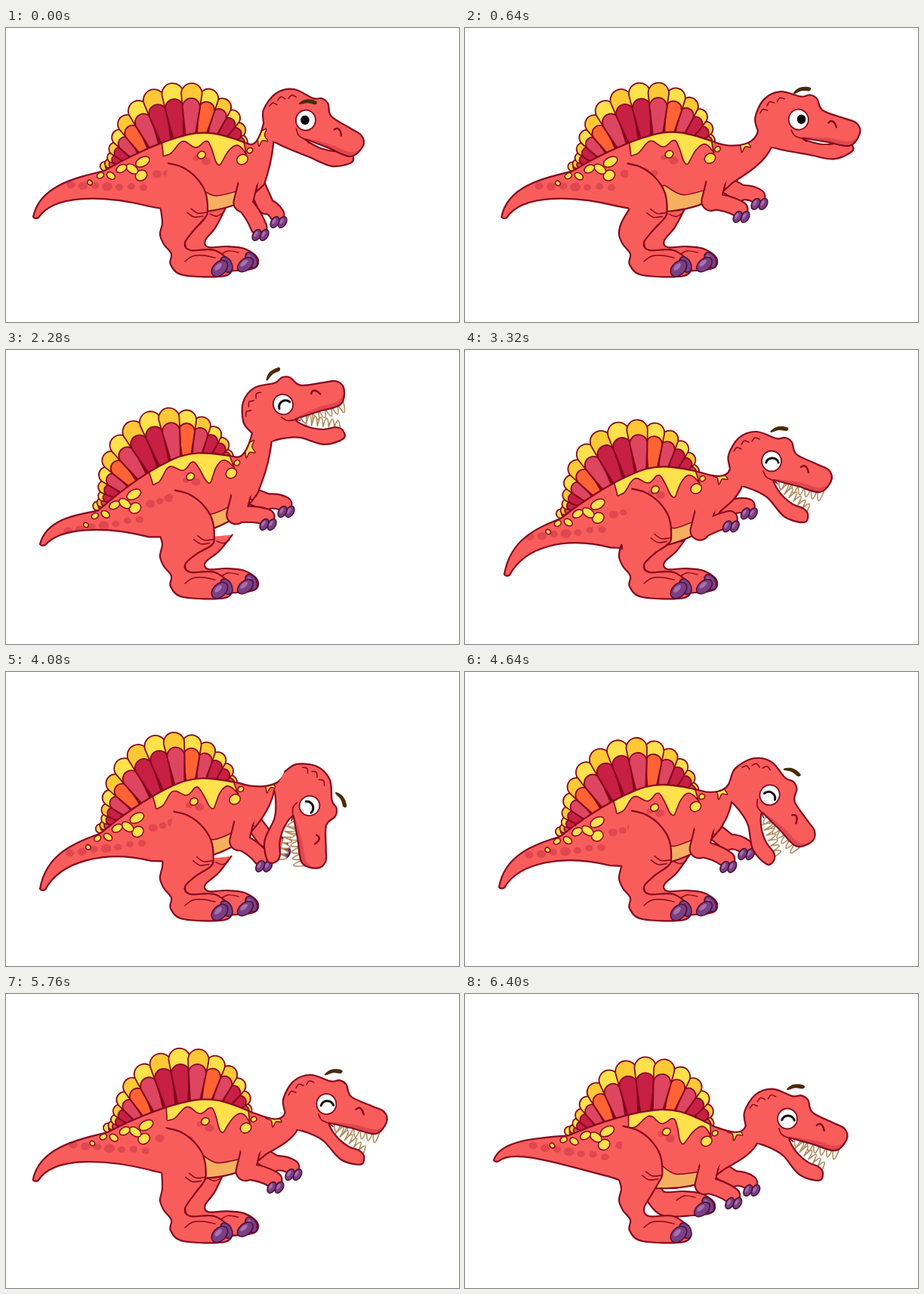
An HTML page with a canvas that plays this animation: 600x389 px, repeating every 6440 ms.

```html
<!DOCTYPE html>
<html lang="en">
<head>
<meta charset="utf-8">
<title>Laughing dinosaur</title>
<style>
html, body { margin: 0; width: 100%; height: 100%; overflow: hidden; background: #fff; }
canvas { display: block; }
</style>
</head>
<body>
<canvas id="stage" width="600" height="389"></canvas>
<script>
const ctx = document.getElementById('stage').getContext('2d');
const LOOP = 6440, STEP = 40, FEATHERS = 15;
const RED = '#f85d5b', DARK = '#e0474f', LINE = '#86091d', GOLD = '#ffe14b', AMBER = '#ffc936';
const PURPLE = '#7a3f86', LILAC = '#a772aa';
const SAIL = ['#ff6233', '#de4560', '#c81f45', '#c81f45', '#de4560'];

// time, torso x y turn, tail tip x y, eye x y, head turn, arm angle
const poses = [
  [0, 219.5, 165.5, 0, 36, 250, 397, 122, 6.5, 77],
  [800, 233, 165, -1, 51, 250, 447, 121, -8, 45],
  [1320, 235, 167.5, -3, 55, 254, 437, 125, -11.5, 34],
  [2280, 205, 172.5, -11, 45, 257, 367, 72, -32.5, 43],
  [2450, 206, 173, -10, 43, 262, 374, 57, -33, 40],
  [3320, 212.5, 187.5, -7.7, 52, 297, 406, 147, 0, 21],
  [4080, 209.5, 175.5, -9.5, 45, 287, 402, 177, 65, 65],
  [5120, 215.5, 187.5, -4.5, 45, 282, 407, 146, 0, 47],
  [5480, 222, 161, 0, 35, 262, 422, 140, -2, 50],
  [6400, 228, 175, 7, 38, 220, 427, 165, 1, 55]];

const rad = d => d * Math.PI / 180;
const mix = (a, b, k) => a + (b - a) * k;
const between = (a, b, k, l = k) => [mix(a[0], b[0], k), mix(a[1], b[1], l)];
const dist = (a, b) => Math.hypot(b[0] - a[0], b[1] - a[1]);
const range = (n, f) => Array.from({ length: n }, (_, i) => f(i));
const noise = i => Math.abs(Math.sin(i * 12.9898 + 4) * 43758.5453) % 1;
const ease = (t, from, to) => {
  const u = Math.min(1, Math.max(0, (t - from) / (to - from)));
  return u * u * (3 - 2 * u);
};

// Smooth motion through the poses, without overshoot
function poseAt(t) {
  const n = poses.length;
  let i = 0;
  while (i < n - 2 && t >= poses[i + 1][0]) i++;
  const a = poses[i], b = poses[i + 1], h = b[0] - a[0], u = Math.min(1, (t - a[0]) / h);
  const secant = (j, c) => (poses[j + 1][c] - poses[j][c]) / (poses[j + 1][0] - poses[j][0]);
  const slope = (j, c) => {
    if (j === 0 || j === n - 1) return 0;
    const p = secant(j - 1, c), q = secant(j, c);
    return p * q <= 0 ? 0 : 2 * p * q / (p + q);
  };
  return a.map((v, c) => mix(v, b[c], u * u * (3 - 2 * u))
    + h * u * (1 - u) * (slope(i, c) * (1 - u) - slope(i + 1, c) * u));
}

function frame(ox, oy, x, y, deg) {
  const c = Math.cos(rad(deg)), s = Math.sin(rad(deg));
  return ([px, py]) => [x + (px - ox) * c - (py - oy) * s, y + (px - ox) * s + (py - oy) * c];
}

// Adds a smooth curve through the points
function through(path, pts, closed, join) {
  const n = pts.length;
  const at = i => closed ? pts[(i + n) % n] : pts[Math.min(n - 1, Math.max(0, i))];
  if (join) path.lineTo(...pts[0]); else path.moveTo(...pts[0]);
  for (let i = 0; i < (closed ? n : n - 1); i++) {
    const p = at(i - 1), a = at(i), b = at(i + 1), q = at(i + 2);
    path.bezierCurveTo(a[0] + (b[0] - p[0]) / 6, a[1] + (b[1] - p[1]) / 6,
      b[0] - (q[0] - a[0]) / 6, b[1] - (q[1] - a[1]) / 6, b[0], b[1]);
  }
  return path;
}

const curve = (pts, closed) => through(new Path2D(), pts, closed);

function paint(path, fill, line, width = 2.2) {
  if (fill) { ctx.fillStyle = fill; ctx.fill(path); }
  if (line) { ctx.strokeStyle = line; ctx.lineWidth = width; ctx.stroke(path); }
}

function oval([x, y], rx, ry, turn, fill, line, width) {
  const p = new Path2D();
  p.ellipse(x, y, rx, ry, turn, 0, 7);
  paint(p, fill, line, width);
}

function claw(x, y, rx, ry, deg) {
  oval([x, y], rx, ry, rad(deg), PURPLE, '#4d1238', 1.6);
  oval([x - rx * .15, y - ry * .25], rx * .5, ry * .35, rad(deg), LILAC);
}

// Height of the back above the torso's own x
const backY = x => 138 + 51 * (Math.abs(x - 262) / 132) ** 1.5;

function feather(root, tip, r, fill) {
  const a = Math.atan2(tip[1] - root[1], tip[0] - root[0]), c = Math.cos(a), s = Math.sin(a), w = r * .5;
  const p = new Path2D();
  p.moveTo(root[0] + s * w, root[1] - c * w);
  p.arc(tip[0] - c * r, tip[1] - s * r, r, a - Math.PI / 2, a + Math.PI / 2);
  p.lineTo(root[0] - s * w, root[1] + c * w);
  paint(p, fill, LINE, 1.8);
}

function drawSail(T) {
  // A fan whose feathers are narrow at both ends and widest near the top
  const spread = range(FEATHERS, i => {
    const u = i / (FEATHERS - 1), w = u ** 1.3 - .05 * Math.sin(2 * Math.PI * u);
    const a = rad(mix(-190, -12, w)), r = 85 + 6 * Math.sin(Math.PI * u) + 27 * (1 - u) ** 5;
    const x = mix(150, 306, w);
    return { tip: T([235 + r * Math.cos(a), 163 + r * Math.sin(a)]), root: T([x, backY(x) + 6]) };
  });
  const order = [...spread.keys()].sort((a, b) => Math.abs(b - 9) - Math.abs(a - 9));
  for (const i of order) {
    const { tip, root } = spread[i];
    const a = Math.max(0, i - 1), b = Math.min(FEATHERS - 1, i + 1);
    const r = Math.max(6, dist(spread[a].tip, spread[b].tip) / (b - a) / 2 + .6);
    feather(root, tip, r, i % 2 ? AMBER : GOLD);
    feather(root, between(root, tip, .73), r * .84, SAIL[i % 5]);
  }
}

function limb(a, elbow, hand, w1, w2) {
  const upper = new Path2D(), fore = new Path2D();
  upper.moveTo(...a); upper.lineTo(...elbow);
  fore.moveTo(...elbow);
  fore.quadraticCurveTo(mix(elbow[0], hand[0], .6), mix(elbow[1], hand[1], .5) - 4, ...hand);
  for (const [color, extra] of [[LINE, 4.2], [RED, 0]]) {
    paint(upper, null, color, w1 + extra);
    paint(fore, null, color, w2 + extra);
  }
  for (const dx of [7, -3]) claw(hand[0] + dx, hand[1] + 10, 8, 5, 120);
}

function drawFarLeg([kx, ky], lift) {
  const foot = (x, y) => [x - lift * 3, y - lift * 28];
  const hip = [kx + 24, ky - 4], heel = foot(264, 281);
  paint(curve([hip, between(hip, heel, .5, .6), heel, foot(268, 290), foot(292, 289), foot(316, 292),
    foot(333, 304), foot(330, 317), foot(305, 321), foot(262, 320), foot(238, 290), [240, 250]]), RED, LINE);
  paint(curve([foot(283, 301), foot(294, 295), foot(308, 297)]), null, LINE, 1.4);
  paint(curve([[kx + 3, ky + 4], [kx + 12, ky + 7], [kx + 20, ky + 3]]), null, LINE, 1.4);
  claw(...foot(325, 307), 11, 7, 62);
  claw(...foot(317, 313), 12, 7.5, -40);
}

function drawLeg(T, knee) {
  const [x, y] = knee;
  paint(curve([[x - 52, y - 63], [x - 34, y - 58], [x - 16, y - 45], [x - 3, y - 25], knee, [x - 4, y + 10],
    between([238, 283], knee, .38), [237, 284], [244, 294], [276, 294], [298, 312], [290, 328],
    [235, 327], [218, 313], [219, 299], [209, 286], [204, 273], [207, 258], T([205, 240])]), RED, LINE);
  for (const d of [0, 5])
    paint(curve([[x - 22 - d, y - 3 + d], [x - 13 - d, y + 3 + d], [x - 1 - d, y + 2 + d]]), null, LINE, 1.5);
  paint(curve([[237, 309], [247, 302], [262, 301], [277, 304]]), null, LINE, 1.4);
  claw(292, 313, 11, 7, 62);
  claw(283, 318, 12.5, 8.5, -45);
}

function drawMarkings(T) {
  for (let i = 0; i < 13; i++) {
    const onTail = i < 7, x = onTail ? 182 - 16 * i : 200 + 13 * (i - 7);
    const y = onTail ? 207 + 7 * noise(i) : 166 + 28 * noise(i), r = 4 + 3 * noise(i + 40);
    oval(T([x, y]), r, r * .85, 0, DARK);
  }
  paint(curve([[250, 210], [278, 222], [330, 212], [330, 240], [260, 250]].map(T), true), '#f6af60', LINE, 1.5);

  // Wavy lower edge with one deep drip
  const edge = range(23, i => {
    const x = 208 + i * 5;
    const drip = 27 * Math.exp(-(((x - 280) / 9) ** 2));
    return [x, backY(x) + 13 + 6 * Math.sin((x - 206) * .17) + drip];
  });
  paint(curve([...edge, [300, 130], [216, 134]].map(T), true), GOLD, LINE, 1.6);

  for (const [x, y, r] of [[259, 168, 5.5], [313, 174, 7.5], [323, 162, 4], [179, 195, 8]])
    oval(T([x, y]), r, r * .85, -.5, GOLD, LINE, 1.5);
  for (let i = 0; i < 6; i++)
    oval(T([181 - 14 * i, 177 + 4.5 * i + i % 2 * 5]), 10 - 1.3 * i, 6 - .6 * i, i % 2 ? .6 : -.5, GOLD, LINE, 1.5);
}

function drawBody(T, H, tip) {
  const back = range(9, i => T([130 + 24 * i, backY(130 + 24 * i)]));
  const belly = [[342, 207], [322, 224], [297, 236], [263, 243], [230, 243], [190, 236]].map(T);
  const root = back[0], top = back[8], chest = belly[0], under = belly[5];
  const nape = H([-55, 10]), throat = H([-39, 33]);
  const drop = tip[1] - root[1], bend = [tip[0] + 8, tip[1] - drop * .5 - 10];
  const reach = dist(top, nape);
  const n1 = [top[0] + reach * .3, top[1] + reach * .1], n2 = [nape[0] - reach * .1, nape[1] + reach * .4];

  const p = new Path2D();
  p.moveTo(...tip);
  p.bezierCurveTo(...bend, ...between(root, bend, .47), ...root);
  through(p, back, false, true);
  p.bezierCurveTo(...n1, ...n2, ...nape);
  p.lineTo(...H([-25, 5]));
  p.lineTo(...throat);
  p.bezierCurveTo(...between(throat, chest, .2, .45), ...between(throat, chest, .6, .72), ...chest);
  through(p, belly, false, true);
  p.bezierCurveTo(under[0] - 60, under[1] - 15, tip[0] + 27, tip[1] - drop * .5, tip[0] + 7, tip[1] + 1);
  p.quadraticCurveTo(tip[0] + 2, tip[1] + 3, ...tip);

  paint(p, RED);
  ctx.save();
  ctx.clip(p);
  drawMarkings(T);
  const mid = between(between(top, n1, .5), between(n2, nape, .5), .55);
  const star = range(10, i => {
    const a = i * Math.PI / 5 + .5, r = i % 2 ? 7 : 14;
    return [mid[0] + 3 + r * .8 * Math.cos(a), mid[1] + r * Math.sin(a)];
  });
  paint(curve(star, true), GOLD, LINE, 1.5);
  ctx.restore();
  paint(p, null, LINE);
}

function teeth(a, b, count, len, map) {
  const gap = dist(a, b) / count, nx = -(b[1] - a[1]) / gap / count, ny = (b[0] - a[0]) / gap / count;
  const p = new Path2D();
  p.moveTo(...map(a));
  for (let i = 0; i < count; i++) {
    const [x, y] = between(a, b, (i + .5) / count), l = len * (1.5 + .7 * i / count);
    p.quadraticCurveTo(...map([x + nx * l, y + ny * l]), ...map(between(a, b, (i + 1) / count)));
  }
  paint(p, '#fff', '#b18a5c', 1.7);
}

function drawHead(H, turn, open, lift, laughing) {
  const J = frame(0, 25, 0, 25, mix(-37, -4, open)), bite = Math.min(1, open * 2);
  if (bite > 0) {
    teeth([10, 25], [70, 38], 7, 15 * bite, H);
    teeth([44, 70], [10, 40], 6, 13 * bite, q => H(J(q)));
  }
  const jaw = [[6, 36], [14, 48], [26, 59], [40, 66], [45, 75], [39, 84], [14, 75], [-6, 49]].map(J);
  paint(curve([[2, 25], ...jaw, [-22, 39], [-39, 33]].map(H)), RED, LINE);

  const skull = curve([[-55, 10], [-57, -8], [-43, -31], [-20, -39], [6, -30], [18, -31], [27, -25], [33, -9],
    [60, 4], [76, 12], [79, 26], [64, 41], [34, 33], [3, 25]].map(H));
  const face = new Path2D(skull);
  for (const q of [[-2, 34], [-39, 33]]) face.lineTo(...H(q));
  face.closePath();
  paint(face, RED);
  ctx.save();
  ctx.clip(face);
  paint(curve([[3, 25], [36, 28], [64, 35], [84, 28], [76, 48], [34, 44]].map(H), true), DARK);
  ctx.restore();
  paint(skull, null, LINE);

  const line = (pts, width, color = LINE) => paint(curve(pts.map(H)), null, color, width);
  for (const [x, y] of [[-46, -16], [-36, -25], [-22, -29]])
    line([[x - 4, y + 3], [x, y - 2], [x + 6, y]], 1.5);
  line([[-11, 13], [-7, 21], [3, 26], [8, 30]], 1.6);
  line([[39, 8], [43, 6], [47, 9], [49, 15]], 2.4);

  oval(H([0, 0]), 13, 13.5, rad(turn), '#fff', LINE, 1.8);
  if (laughing) {
    line(range(7, i => {
      const a = rad(195 + i * 25);
      return [1 + 8.5 * Math.cos(a), 4 + 8 * Math.sin(a)];
    }), 3, '#111');
  } else {
    oval(H([mix(-1, 5, lift), 0]), 5.8, 6.2, 0, '#090909');
  }

  const B = ([x, y]) => H([mix(0, 10, lift) + x, mix(-24, -42, lift) + y]);
  paint(curve([[-11, 2], [-4, -3], [4, -4], [12, -2], [10, 2], [0, 1], [-10, 4]].map(B), true), '#4a2b0b');
}

function draw(t) {
  const [, x, y, turn, tailX, tailY, eyeX, eyeY, headTurn, armTurn] = poseAt(t);
  const T = frame(219.5, 165.5, x, y, turn), H = frame(0, 0, eyeX, eyeY, headTurn);
  const knee = [267 - turn * .8, 242 - turn * .6];
  const shoulder = T([321, 203]), farTop = T([332, 208]);
  const reach = 24 + armTurn * .5, a = rad(armTurn);
  const hand = [shoulder[0] + reach * Math.cos(a), shoulder[1] + reach * Math.sin(a)];
  const elbow = [shoulder[0] - 7, shoulder[1] + 28];
  const farHand = [hand[0] + 24, hand[1] - 17];

  ctx.fillStyle = '#fff';
  ctx.fillRect(0, 0, 600, 389);
  ctx.lineCap = ctx.lineJoin = 'round';

  drawSail(T);
  drawFarLeg(knee, ease(t, 5650, 6400));
  limb(farTop, between(farTop, farHand, .45, .7), farHand, 20, 17);
  drawBody(T, H, [tailX, tailY]);
  drawLeg(T, knee);
  limb(shoulder, elbow, hand, 23, 19);
  // Hide the seam where the arm meets the chest
  oval([shoulder[0], shoulder[1] - 4], 14.5, 13, 0, RED);
  drawHead(H, headTurn, ease(t, 650, 1300), ease(t, 0, 900), t > 1400);
}

function tick() {
  const t = performance.now() % LOOP;
  draw(Math.floor(t / STEP) * STEP);
  requestAnimationFrame(tick);
}
tick();
</script>
</body>
</html>
```
